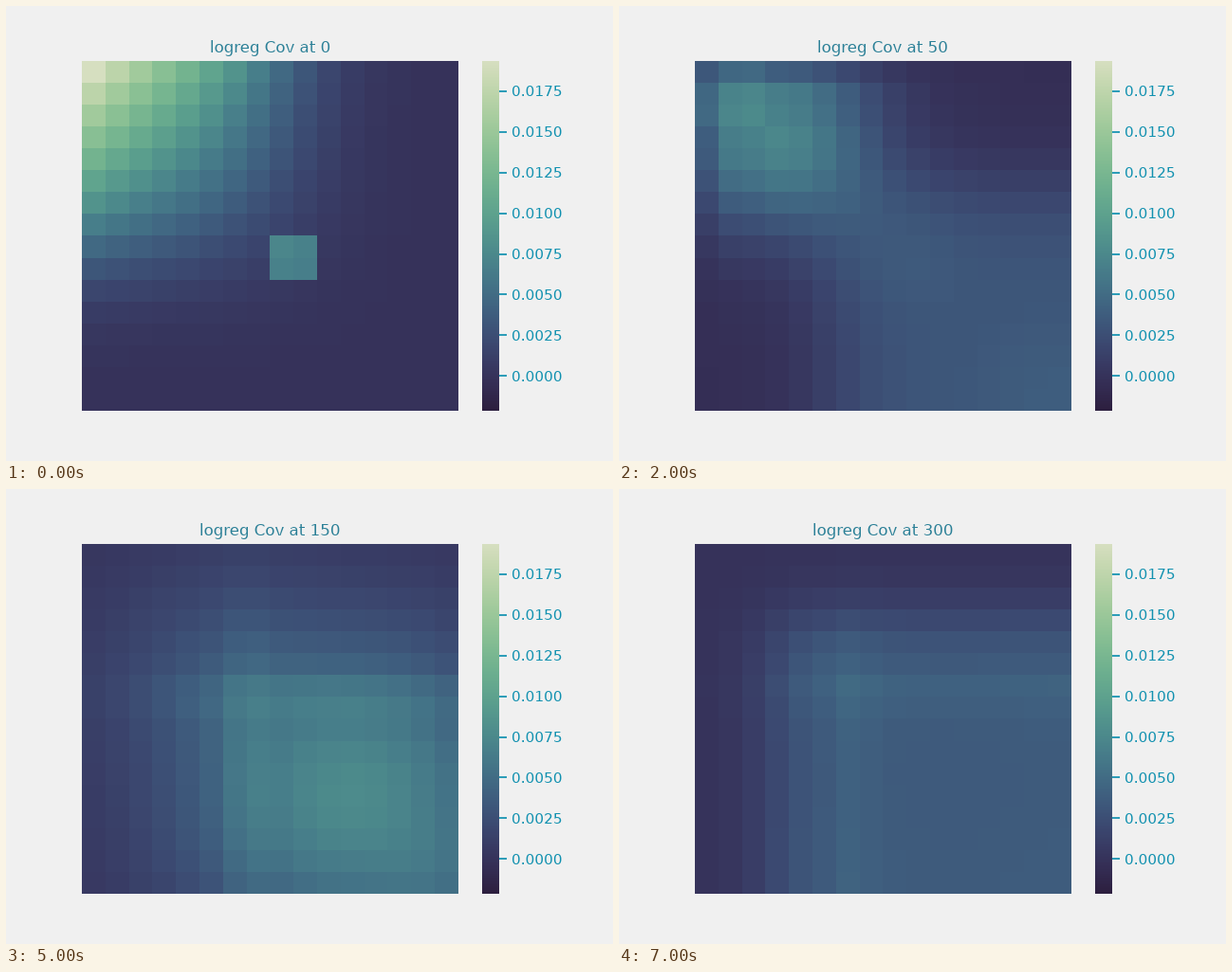
A matplotlib script for the animation above (8 s loop, 640 px wide and 480 px high).

```python
import numpy as np
import matplotlib.pyplot as plt
from matplotlib.animation import FuncAnimation
from matplotlib.colors import ListedColormap

N = 16
I = np.arange(N)
VMIN, VMAX = -0.00215, 0.01938
BACK, TITLE, TICK = "#f0f0f0", "#2b8097", "#1191b0"
STEPS = [0, 25, 50, 75, 100, 150, 200, 300]

plt.rcParams["text.hinting"] = "native"


def cubehelix(start=0.5, rot=-0.75, hue=0.8, dark=0.15, light=0.85):
    x = np.linspace(dark, light, 256)
    amp = hue * x * (1 - x) / 2
    phi = 2 * np.pi * (start / 3 + rot * x)
    weights = [(-0.14861, 1.78277), (-0.29227, -0.90649), (1.97294, 0.0)]
    rgb = [x + amp * (p * np.cos(phi) + q * np.sin(phi)) for p, q in weights]
    return ListedColormap(np.clip(np.transpose(rgb), 0, 1))


# Profiles over the matrix index, heights in thousandths.
def hill(height, mid, left, right):
    width = np.where(I < mid, left, right)
    return height * np.exp(-((I - mid) / width) ** 2 / 2)


def step(height, mid, width):
    return height / (1 + np.exp((mid - I) / width))


def block(height, first, last):
    return height * ((I >= first) & (I <= last))


def cov(*profiles):
    return sum(np.outer(p, p) for p in profiles) / 1e6


def build():
    decay = 139 * np.exp(-I / 9 - (I / 9.5) ** 4)
    split = np.where(I < 7, -4.3 * I, 87 * (1 - np.exp((7 - I) / 3.5)))
    maps = {
        0: cov(decay, block(78, 8, 9)),
        25: cov(hill(108, 0, 5, 5) + block(14, 0, 0) + block(-12, 1, 2),
                hill(77, 6.5, 3.8, 4.4) + block(-12, 0, 2),
                block(30, 1, 2)),
        50: cov(hill(86, 3, 2.6, 3) + block(12, 1, 1),
                step(60, 5, 1) - 8 + hill(7, 9, 1.5, 1.5),
                block(35, 0, 2),
                step(34, 11.5, 1)),
        100: cov(split,
                 step(48, 6.2, -0.5) + block(-10, 0, 0),
                 hill(37, 6.4, 0.8, 1.8)),
        150: cov(hill(88, 11, 5.3, 5) + block(10, 6, 7),
                 hill(38, 5.5, 4.5, 2.3),
                 step(36, 13, 0.6)),
        300: cov(step(61, 2.8, 0.8) + hill(10, 6, 0.5, 0.8)
                 + hill(-2, 10.5, 2, 2),
                 hill(18, 4.7, 0.7, 0.6)),
    }
    maps[75] = (maps[50] + maps[100]) / 2
    maps[200] = maps[150] - cov(hill(28, 10, 1.2, 1.2))
    return maps


MAPS = build()

fig = plt.figure(figsize=(6.4, 4.8), dpi=100, facecolor=BACK)
ax = fig.add_axes([0.125, 0.11, 0.62, 0.77])
bar_ax = fig.add_axes([0.78375, 0.11, 0.028875, 0.77])

mesh = ax.pcolormesh(MAPS[0], cmap=cubehelix(), vmin=VMIN, vmax=VMAX)
ax.set(xlim=(0, N), ylim=(N, 0))
ax.set_axis_off()
title = ax.set_title("", fontsize=12, color=TITLE, fontfamily="DejaVu Sans")

bar = fig.colorbar(mesh, cax=bar_ax)
bar.outline.set_linewidth(0)
bar.set_ticks(np.arange(8) * 0.0025)
bar_ax.yaxis.set_major_formatter("{x:.4f}")
bar_ax.tick_params(length=6, width=1.25, pad=3.5, labelsize=11,
                   color=TICK, labelcolor=TICK, labelfontfamily="DejaVu Sans")


def draw(i):
    count = STEPS[i]
    mesh.set_array(MAPS[count])
    title.set_text(f"logreg Cov at {count}")
    return mesh, title


anim = FuncAnimation(fig, draw, frames=len(STEPS), interval=1000, repeat=True,
                     repeat_delay=0, blit=False)
plt.show()
```
